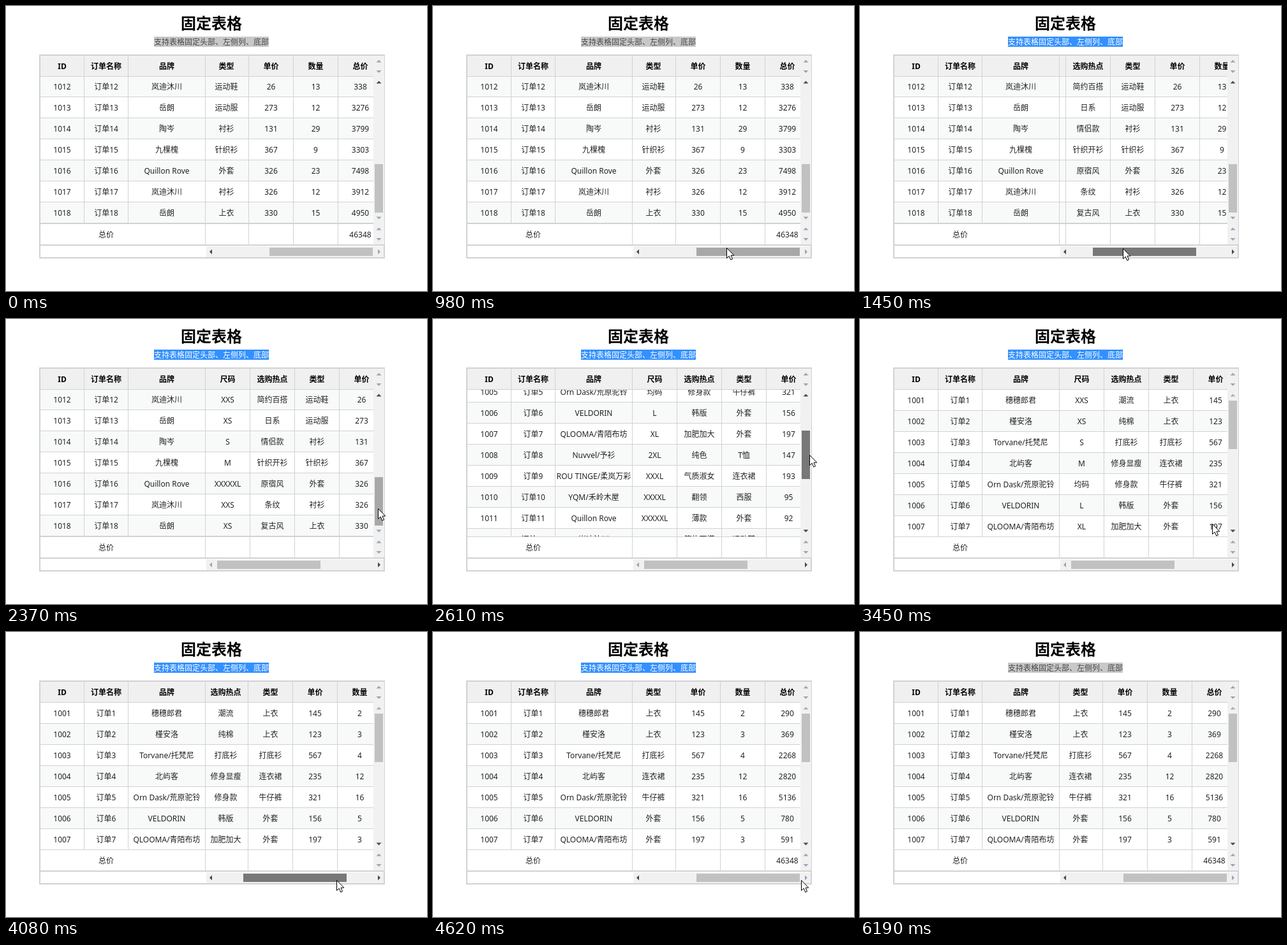
Write an HTML page with a canvas that moves like this. It is 660x447 px and loops after 6.34 s.

```html
<!DOCTYPE html>
<html lang="zh-CN">
<head>
<meta charset="utf-8">
<title>固定表格</title>
<style>
html, body { margin: 0; width: 100%; height: 100%; overflow: hidden; background: #fff; }
canvas { display: block; }
</style>
</head>
<body>
<canvas id="stage" width="660" height="447"></canvas>
<script>
const ctx = document.getElementById('stage').getContext('2d');
const LOOP = 6340, STEP = 77;
const FONT = '"Noto Sans", "Noto Sans CJK SC", "Noto Sans CJK", sans-serif';
const LINE = '#d2d2d2', TRACK = '#f1f1f1', DARK = '#484848', DIM = '#98a4b9';
const ROW = 33, COL = 70, HEAD = 78, TOP = HEAD + ROW, FOOT = 341, LEFT = 313, RIGHT = 576;
const MID = 17;
const SCROLL_X = 142, SCROLL_Y = 364;
const TRAVEL_X = 82, TRAVEL_Y = 120;
const THUMB_X = 331, THUMB_Y = 128, THUMB_W = 162, THUMB_H = 76;

// brand | size | feature | type | price | quantity
const rows = `穗穗郎君|XXS|潮流|上衣|145|2
槿安洛|XS|纯棉|上衣|123|3
Torvane/托梵尼|S|打底衫|打底衫|567|4
北屿客|M|修身显瘦|连衣裙|235|12
Orn Dask/荒原驼铃|均码|修身款|牛仔裤|321|16
VELDORIN|L|韩版|外套|156|5
QLOOMA/青陌布坊|XL|加肥加大|外套|197|3
Nuvvel/予衫|2XL|纯色|T恤|147|10
ROU TINGE/柔岚万彩|XXXL|气质淑女|连衣裙|193|12
YQM/禾岭木屋|XXXXL|翻领|西服|95|4
Quillon Rove|XXXXXL|薄款|外套|92|31
岚迪沐川|XXS|简约百搭|运动鞋|26|13
岳朗|XS|日系|运动服|273|12
陶岑|S|情侣款|衬衫|131|29
九棵槐|M|针织开衫|针织衫|367|9
Quillon Rove|XXXXXL|原宿风|外套|326|23
岚迪沐川|XXS|条纹|衬衫|326|12
岳朗|XS|复古风|上衣|330|15`.split('\n').map((line, i) => {
  const [brand, ...rest] = line.split('|');
  return {
    fixed: [1001 + i, '订单' + (i + 1), brand],
    cells: [...rest, rest[3] * rest[4]]
  };
});
const grandTotal = rows.reduce((sum, r) => sum + r.cells[5], 0);
const fixedHeads = ['ID', '订单名称', '品牌'];
const heads = ['尺码', '选购热点', '类型', '单价', '数量', '总价'];
const fixedMid = [88, 157, 252];
const fixedLines = [122, 191, 312];

// Pointer moves: start time, steps, end point, thumb being dragged
const moves = [
  [440, 4, 463, 378],
  [980, 2, 459, 380],
  [1130, 1, 459, 380, 'x'],
  [1300, 7, 375.5, 380, 'x'],
  [1910, 4, 579, 319],
  [2370, 2, 585, 285],
  [2530, 6, 596, 126.5, 'y'],
  [3220, 4, 552, 321],
  [3530, 5, 476, 387],
  [3910, 8, 559, 390, 'x'],
  [4620, 8, 660, 382]
];

const clamp = (v, max) => Math.max(0, Math.min(max, v));
const within = (v, start, size) => v >= start && v < start + size;
const easeOut = p => 1 - (1 - p) ** 1.5;

function stateAt(t) {
  const s = { x: 500, y: 432, tx: TRAVEL_X, ty: TRAVEL_Y, grip: '' };
  for (const [start, steps, endX, endY, grip] of moves) {
    if (t < start) break;
    const done = Math.min(steps, Math.floor((t - start) / STEP) + 1);
    const k = easeOut(done / steps);
    const dx = (endX - s.x) * k, dy = (endY - s.y) * k;
    s.x += dx;
    s.y += dy;
    s.grip = grip;
    if (grip === 'x') s.tx = clamp(s.tx + dx, TRAVEL_X);
    if (grip === 'y') s.ty = clamp(s.ty + dy, TRAVEL_Y);
  }
  return s;
}

function box(x, y, w, h, color) {
  ctx.fillStyle = color;
  ctx.fillRect(x, y, w, h);
}

function label(str, x, mid, color = '#222', size = 12, weight = 400) {
  ctx.font = `${weight} ${size}px ${FONT}`;
  ctx.textAlign = 'center';
  ctx.fillStyle = color;
  ctx.fillText(str, x, mid + Math.round(size * 0.37));
}

function clipped(x, y, w, h, draw) {
  ctx.save();
  ctx.beginPath();
  ctx.rect(x, y, w, h);
  ctx.clip();
  draw();
  ctx.restore();
}

function arrow(x, y, dx, dy, color) {
  ctx.fillStyle = color;
  ctx.beginPath();
  ctx.moveTo(x + dx * 2.5, y + dy * 2.5);
  ctx.lineTo(x - dx * 1.5 + dy * 4, y - dy * 1.5 + dx * 4);
  ctx.lineTo(x - dx * 1.5 - dy * 4, y - dy * 1.5 - dx * 4);
  ctx.fill();
}

const columnMid = (c, sx) => LEFT + 34.5 + COL * c - sx;

// Draws inside the sideways scrolling part of a band
function scrolled(y, h, sx, draw) {
  clipped(LEFT, y, RIGHT - LEFT, h, () => {
    for (let c = 1; c < heads.length; c++) box(LEFT - 1 + COL * c - sx, y, 1, h, LINE);
    draw();
  });
}

function drawHeader(sx) {
  box(54, HEAD, RIGHT - 54, ROW, '#f0f0f0');
  scrolled(HEAD, ROW, sx, () =>
    heads.forEach((h, c) => label(h, columnMid(c, sx), HEAD + MID, '#000', 12, 700)));
  fixedHeads.forEach((h, c) => label(h, fixedMid[c], HEAD + MID, '#000', 12, 700));
  fixedLines.forEach(x => box(x, HEAD, 1, ROW, LINE));
  box(54, TOP - 1, RIGHT - 54, 1, LINE);
}

function drawBody(sx, sy) {
  const height = FOOT - TOP;
  const rowTop = i => TOP + ROW * i - sy;
  clipped(54, TOP, RIGHT - 54, height, () => {
    rows.forEach((row, i) => {
      const y = rowTop(i);
      if (i % 2) box(54, y, RIGHT - 54, ROW, '#f8f9f9');
      box(54, y + ROW - 1, RIGHT - 54, 1, LINE);
      row.fixed.forEach((s, c) => label(s, fixedMid[c], y + MID));
    });
    fixedLines.forEach(x => box(x, TOP, 1, height, LINE));
    scrolled(TOP, height, sx, () => rows.forEach((row, i) =>
      row.cells.forEach((s, c) => label(s, columnMid(c, sx), rowTop(i) + MID))));
  });
}

function drawFooter(sx) {
  box(54, FOOT, RIGHT - 54, 1, LINE);
  label('总价', 157, FOOT + 1 + MID);
  box(312, FOOT, 1, ROW, LINE);
  scrolled(FOOT, ROW, sx, () => label(grandTotal, columnMid(5, sx), FOOT + 1 + MID));
}

function drawFrame() {
  box(52, 76, 542, 2, LINE);
  box(52, 76, 2, 320, LINE);
  box(593, 76, 1, 320, LINE);
  box(592, 374, 1, 22, LINE);
  box(52, 394, 542, 2, LINE);
  box(54, 374, 539, 2, LINE);
}

const thumbColor = (pressed, hover) => pressed ? '#787878' : hover ? '#a8a8a8' : '#c1c1c1';

function drawBars({ x, y, tx, ty, grip }) {
  const left = Math.floor(THUMB_X + tx), top = Math.floor(THUMB_Y + ty);
  const overX = within(y, 377, 17) && within(x, left, THUMB_W);
  const overY = within(x, RIGHT, 17) && within(y, top, THUMB_H);

  box(RIGHT, 77, 17, 298, TRACK);
  for (const up of [87, 350]) {
    arrow(584.5, up, 0, -1, DIM);
    arrow(584.5, up + 15.5, 0, 1, DIM);
  }
  arrow(584.5, 120, 0, -1, ty > 0 ? DARK : '#9fb3a9');
  arrow(584.5, 332, 0, 1, ty < TRAVEL_Y ? DARK : DIM);
  box(578, top, 13, THUMB_H, thumbColor(grip === 'y', overY));

  box(314, 377, 278, 17, TRACK);
  arrow(321.5, 385.5, -1, 0, tx > 0 ? DARK : '#a3a3a3');
  arrow(584.5, 385.5, 1, 0, tx < TRAVEL_X ? DARK : DIM);
  box(left, 379, THUMB_W, 13, thumbColor(grip === 'x', overX));
}

function drawCursor(x, y) {
  const shape = [[0, 0], [0, 16], [3.7, 12.6], [6.3, 18.6], [9, 17.4], [6.5, 11.6], [11.3, 11.6]];
  ctx.beginPath();
  shape.forEach(([px, py]) => ctx.lineTo(Math.round(x) + px + 0.5, Math.round(y) + py + 0.5));
  ctx.closePath();
  ctx.fillStyle = '#fff';
  ctx.fill();
  ctx.strokeStyle = '#000';
  ctx.lineWidth = 1;
  ctx.stroke();
}

function render(t) {
  const state = stateAt(t + 6);
  const sx = Math.round(state.tx / TRAVEL_X * SCROLL_X);
  const sy = Math.round(state.ty / TRAVEL_Y * SCROLL_Y);
  const focused = t >= 1300 && t < 6190;

  box(0, 0, 660, 447, '#fff');
  label('固定表格', 322, 27, '#000', 24, 700);
  box(232, 48, 180, 16, focused ? '#3390ff' : '#c8c8c8');
  label('支持表格固定头部、左侧列、底部', 322, 57, focused ? '#fff' : '#484848');

  drawHeader(sx);
  drawBody(sx, sy);
  drawFooter(sx);
  drawBars(state);
  drawFrame();
  if (t >= 440) drawCursor(state.x, state.y);
}

const begin = performance.now();
function tick() {
  render((performance.now() - begin) % LOOP);
  requestAnimationFrame(tick);
}
tick();
</script>
</body>
</html>
```
